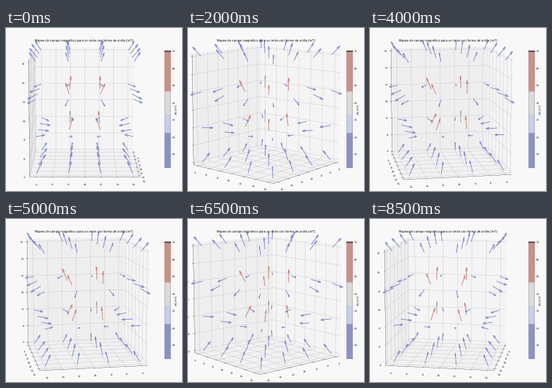
A matplotlib script for the animation above (9500 ms loop, 220x204 px).

```python
import numpy as np
import matplotlib.pyplot as plt
from matplotlib.animation import FuncAnimation

W, H, DPI = 220, 204, 20
BACK = "#f8f8f8"
EDGES = [2.1, 22.5, 33.2, 46.5, 70]
BAR_COLORS = ["#8a92cd", "#c8cee9", "#dcd9d6", "#cd8f87"]
ARROW_COLORS = ["#7880d0", "#b4bce4", "#a5a19f", "#cc7a72"]
STEPS = 9
FRAMES = 19

plt.rcParams.update({
    "font.family": "DejaVu Sans",
    "font.size": 11,
    "text.hinting": "none",
    "path.snap": False,
    "grid.linewidth": 0.9,
})


def ring_field(points, center=(9.5, 9.9, 10.2), radius=2.9, count=36, bias=0.0012):
    """Field of a ring of upright dipoles plus a weak uniform part."""
    total = np.zeros_like(points)
    up = np.array([0, 0, 1.0])
    for angle in np.linspace(0, 2 * np.pi, count, endpoint=False):
        source = np.array(center) + radius * np.array([np.cos(angle), np.sin(angle), 0])
        d = points - source
        r = np.linalg.norm(d, axis=1, keepdims=True)
        total += (3 * d * d[:, 2:] / r**2 - up) / r**3
    return total / count + bias * up


def px_rect(left, top, width, height):
    return [left / W, 1 - (top + height) / H, width / W, height / H]


def draw_bar(fig):
    bar = fig.add_axes(px_rect(198.4, 29, 7.3, 146))
    for lo, hi, color in zip(EDGES, EDGES[1:], BAR_COLORS):
        bar.axhspan(lo, hi, color=color, lw=0)
    bar.axhline(EDGES[-1], color="black", lw=3.5, clip_on=False)
    bar.set(xticks=[], yticks=range(10, 71, 10), ylim=(EDGES[0], EDGES[-1]))
    bar.yaxis.tick_right()
    bar.yaxis.set_label_position("right")
    bar.set_ylabel("|B| [mT]", labelpad=2)
    for spine in bar.spines.values():
        spine.set_linewidth(0.6)


def draw_arrows(ax):
    grid = np.arange(4.0, 17, 4)
    points = np.array(np.meshgrid(grid, grid, grid)).reshape(3, -1).T
    field = ring_field(points)
    size = np.linalg.norm(field, axis=1)
    band = np.digitize(70 * size / size.max(), EDGES[1:-1])
    for k, color in enumerate(ARROW_COLORS):
        pick = band == k
        if pick.any():
            ax.quiver(*points[pick].T, *field[pick].T, length=1.45, normalize=True,
                      color=color, linewidth=2.8, clip_on=False)


fig = plt.figure(figsize=(W / DPI, H / DPI), dpi=DPI, facecolor=BACK)
ax = fig.add_axes(px_rect(12, 17, 170, 170), projection="3d", facecolor=BACK)
draw_arrows(ax)
draw_bar(fig)
fig.text(97 / W, 1 - 16 / H,
         "Mapeo de campo magnético para un imán con forma de anillo [mT]",
         ha="center", va="center", fontsize=13.2)

ax.set(xlim=(3.2, 16.8), ylim=(3.2, 16.8), zlim=(3.75, 16.25))
ticks = range(4, 17, 2)
ax.set(xticks=ticks, yticks=ticks, zticks=ticks)
ax.tick_params(pad=6)
ax.set_box_aspect((1, 1, 1), zoom=1.183)
# Window of the projection plane shown in the axes rectangle
ax.viewLim.intervalx = (-0.0865, 0.0835)
ax.viewLim.intervaly = (-0.0798, 0.0785)


def update(i):
    step = i if i <= STEPS else max(1, 2 * STEPS - i)
    # Stay just off the exact side views so the axes keep their edges
    azim = np.clip(10 * step, 0.01, 89.99)
    ax.view_init(elev=10, azim=azim)
    return []


anim = FuncAnimation(fig, update, frames=FRAMES, interval=500,
                     repeat=True, repeat_delay=0, blit=False)
plt.show()
```
